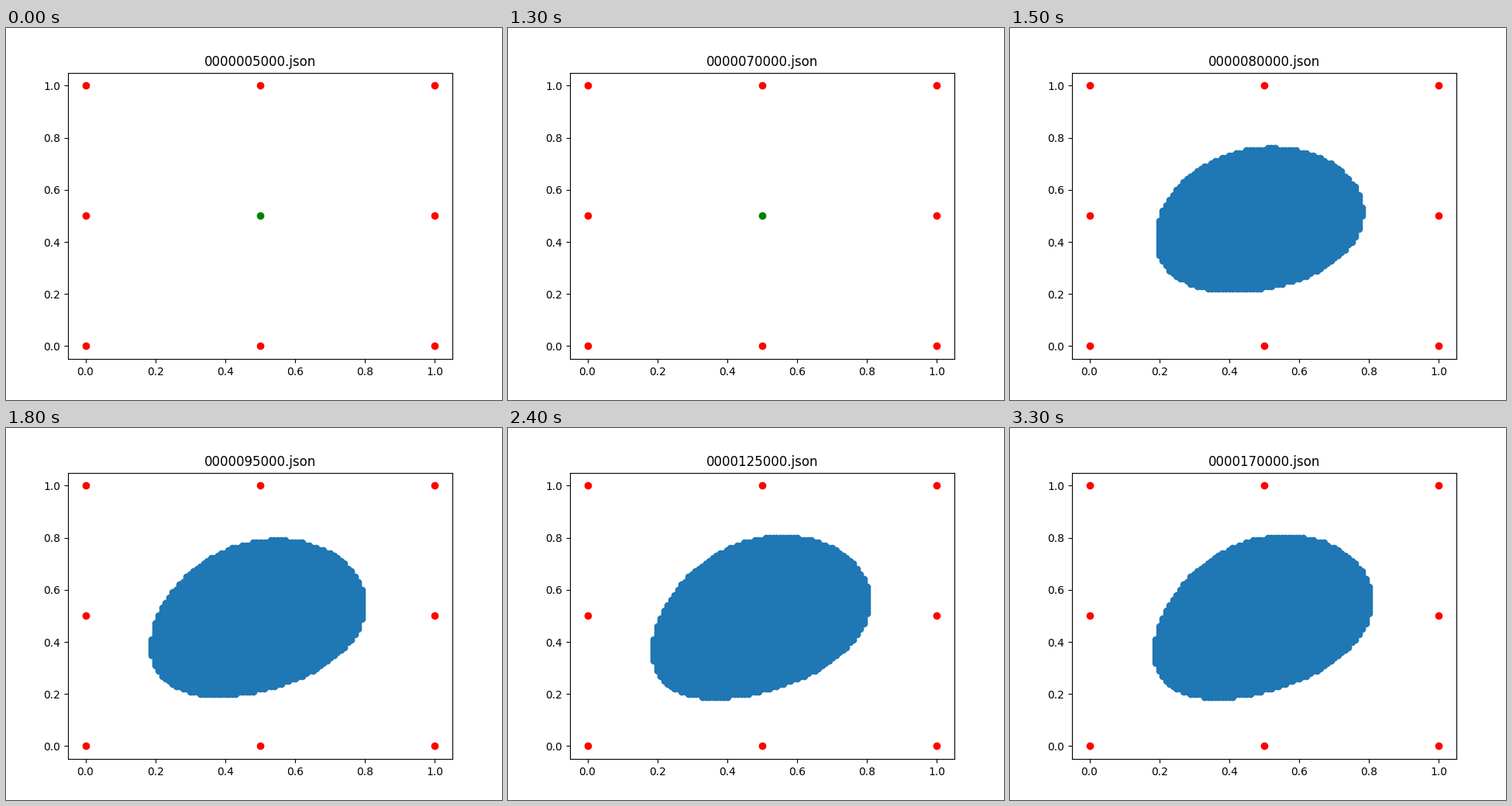
A matplotlib script that plays this animation: 640 px wide and 480 px high, repeating every 3.4 s.

```python
import numpy as np
import matplotlib.pyplot as plt
from matplotlib.animation import FuncAnimation

FRAMES = 34
START = 14                                   # first step with a filled region
plt.rcParams["text.kerning_factor"] = 6      # classic glyph spacing

ticks = np.arange(101) / 100
X, Y = (g.ravel() for g in np.meshgrid(ticks, ticks))
ALONG, ACROSS = (X + Y) / 2, (Y - X) / 2     # diagonal coordinates


def region(i):
    """Grid points inside an egg on the diagonal that settles exponentially."""
    g = np.exp(-(i - 15) / 2.7)
    center = 0.4835 - 0.0065 * g
    length = 0.251 - 0.032 * g
    taper = 0.15 - 0.05 * g
    tilt = -0.0135 * g

    t = (ALONG - center) / length
    width = 0.182 * np.sqrt(np.clip(1 - t**2, 0, None)) * (1 + taper * t)
    inside = (np.abs(t) < 1) & (np.abs(ACROSS - tilt * t) <= width)
    return X[inside], Y[inside]


fig, ax = plt.subplots(figsize=(6.4, 4.8), dpi=100)
ax.set_xlim(-0.05, 1.05)
ax.set_ylim(-0.05, 1.05)
title = ax.set_title("")

marks = (0, 0.5, 1)
anchors = [(x, y) for x in marks for y in marks if (x, y) != (0.5, 0.5)]
ax.plot(*zip(*anchors), "ro")
ax.plot([0.5], [0.5], "go")
blob, = ax.plot([], [], "o", color="C0")


def update(i):
    title.set_text(f"{(i + 1) * 5000:010d}.json")
    blob.set_data(*(region(i) if i >= START else ([], [])))
    return title, blob


anim = FuncAnimation(fig, update, frames=FRAMES, interval=100,
                     repeat=True, repeat_delay=0, blit=False)
plt.show()
```
